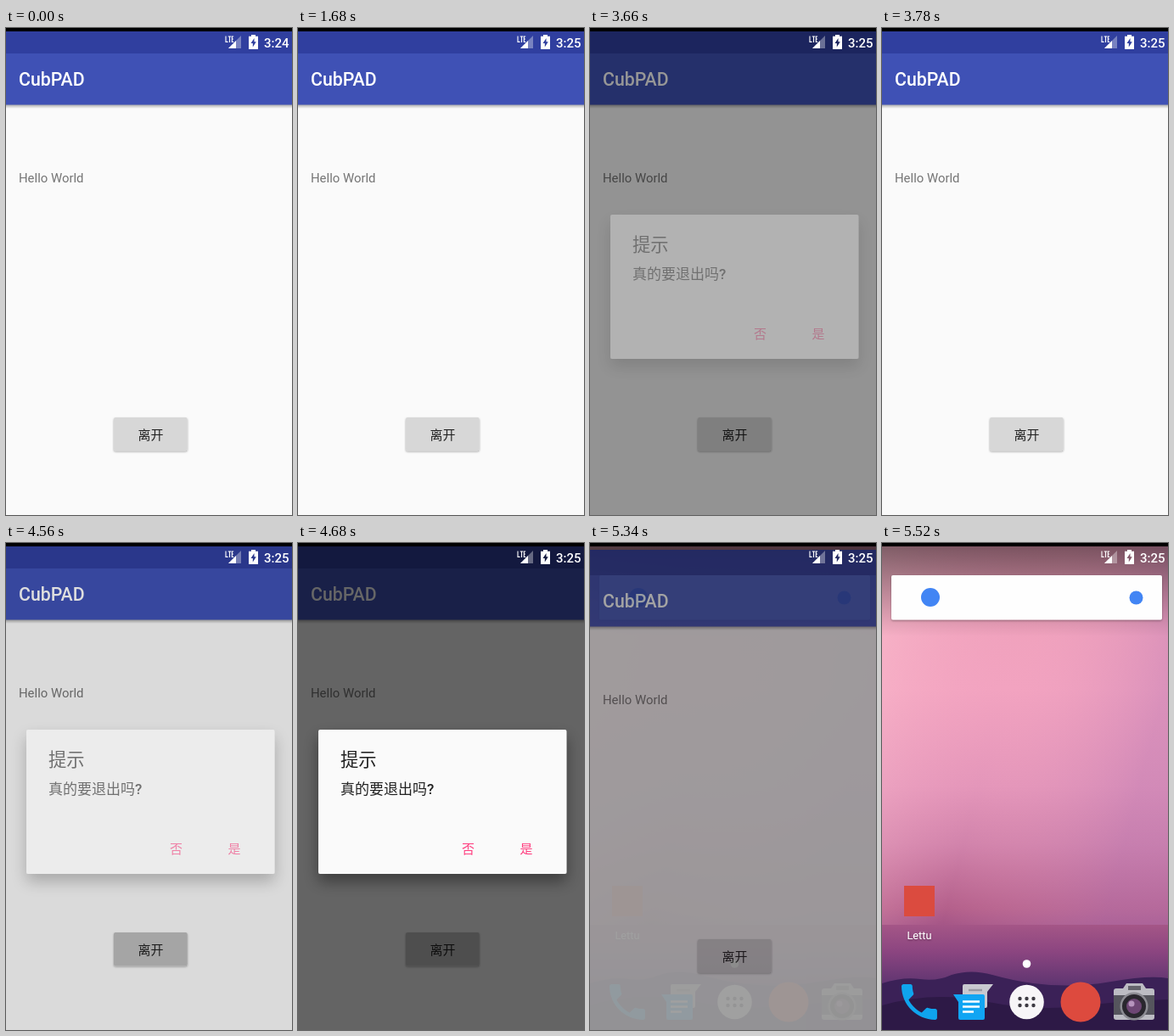
Write an HTML page that moves like this. It is 337 px wide and 574 px high and loops after 7260 ms.

```html
<!DOCTYPE html>
<html lang="zh-CN">
<head>
<meta charset="utf-8">
<title>Exit dialog</title>
<style>
  html, body { margin: 0; width: 100%; height: 100%; overflow: hidden; background: #000; }
  svg { display: block; width: 100%; height: 100%; }
  text { font-family: Roboto, "Noto Sans CJK SC", "Noto Sans CJK", sans-serif; }
  .medium { font-weight: 500; }
  .mid { text-anchor: middle; }
</style>
</head>
<body>
<svg viewBox="0 0 337 574">
  <defs>
    <linearGradient id="sky" x1="0" y1="0" x2="0" y2="1">
      <stop offset="0" stop-color="#eda0b9"/>
      <stop offset=".3" stop-color="#f2a3c0"/>
      <stop offset=".5" stop-color="#e496ba"/>
      <stop offset=".62" stop-color="#d183ab"/>
      <stop offset=".75" stop-color="#b4608b"/>
      <stop offset=".84" stop-color="#8b4580"/>
      <stop offset=".91" stop-color="#5d3470"/>
      <stop offset="1" stop-color="#38214f"/>
    </linearGradient>
    <linearGradient id="side" x1="0" y1="0" x2="1" y2=".35">
      <stop offset="0" stop-color="#ffc6d2" stop-opacity=".55"/>
      <stop offset=".5" stop-color="#f5a5c0" stop-opacity="0"/>
      <stop offset="1" stop-color="#b878b4" stop-opacity=".4"/>
    </linearGradient>
    <linearGradient id="scrim" x1="0" y1="0" x2="0" y2="1">
      <stop offset="0" stop-color="#000" stop-opacity=".5"/>
      <stop offset="1" stop-color="#000" stop-opacity="0"/>
    </linearGradient>
    <linearGradient id="edge" x1="0" y1="0" x2="0" y2="1">
      <stop offset="0" stop-color="#000" stop-opacity=".34"/>
      <stop offset="1" stop-color="#000" stop-opacity="0"/>
    </linearGradient>
    <filter id="low" x="-10%" y="-20%" width="120%" height="150%">
      <feDropShadow dx="0" dy="1.2" stdDeviation="1" flood-opacity=".35"/>
    </filter>
    <filter id="high" x="-20%" y="-30%" width="140%" height="170%">
      <feDropShadow dx="0" dy="9" stdDeviation="9" flood-opacity=".4"/>
    </filter>
  </defs>

  <g id="home">
    <rect width="337" height="574" fill="url(#sky)"/>
    <rect width="337" height="450" fill="url(#side)"/>
    <path d="M0 519Q25 511 45 514T82 509Q105 502 130 509T178 519Q225 525 270 517T337 513V574H0Z" fill="#3b2157"/>
    <path d="M0 545Q60 528 120 540T230 546T337 538V574H0Z" fill="#2d1946"/>
    <rect width="337" height="110" fill="url(#scrim)"/>
    <rect x="11" y="38" width="319" height="52.5" rx="2" fill="#fefefe" filter="url(#low)"/>
    <circle cx="57" cy="64" r="11" fill="#4285f4"/>
    <circle cx="299.5" cy="64.5" r="8" fill="#4285f4"/>
    <rect x="26" y="404" width="36" height="36" fill="#db4b3f"/>
    <text class="mid" x="44" y="467" font-size="12.8" fill="#fff" filter="url(#low)">Lettu</text>
    <circle cx="170.5" cy="496" r="4.8" fill="#fff"/>
    <path transform="translate(16 513) scale(2.33)" fill="#0fa4ee" d="M6.6 10.8c1.4 2.8 3.8 5.1 6.6 6.6l2.2-2.2c.3-.3.7-.4 1-.2 1.1.4 2.3.5 3.6.5.6 0 1 .5 1 1V20c0 .6-.4 1-1 1C10.600 21 3 13.400 3 4c0-.6.5-1 1-1h3.500c.6 0 1 .5 1 1 0 1.300.2 2.500.6 3.600.1.4 0 .7-.3 1z"/>
    <path d="M97 520H131L124 529V546Q124 548 122 548H97Q95 548 95 546V522Q95 520 97 520Z" fill="#c9c9d0"/>
    <path d="M102 527H118" stroke="#9899a3" stroke-width="2.500"/>
    <path d="M84 532H119Q121 532 121 534V560Q121 562 119 562H92Q90 562 90 560V541Z" fill="#11a5f3"/>
    <path d="M95 540.500H115M95 546.500H115M95 552.500H108" stroke="#fff" stroke-width="2.600"/>
    <circle cx="170.5" cy="541" r="20.300" fill="#f7f5f7"/>
    <path d="M162.500 537h0M170.500 537h0M178.500 537h0M162.500 545h0M170.500 545h0M178.500 545h0" stroke="#3d3a42" stroke-width="4.400" stroke-linecap="round"/>
    <circle cx="234" cy="541" r="23.500" fill="#dd4a3e"/>
    <path d="M276 525H284L288 519H307L311 525H318Q321 525 321 528V559Q321 562 318 562H276Q273 562 273 559V528Q273 525 276 525Z" fill="#bcbcc3"/>
    <path d="M273 533H321V556H273Z" fill="#55555d"/>
    <path d="M290 522H305V527H290Z" fill="#64646c"/>
    <circle cx="297" cy="546" r="16.500" fill="#8d8d94"/>
    <circle cx="297" cy="546" r="14" fill="#29272e"/>
    <circle cx="297" cy="546" r="9" fill="#6d4674"/>
    <circle cx="294" cy="543" r="3.500" fill="#b694bd"/>
  </g>

  <g id="app">
    <rect width="337" height="574" fill="#fafafa"/>
    <rect y="90" width="337" height="5" fill="url(#edge)"/>
    <rect width="337" height="30" fill="#303f9f"/>
    <rect y="30" width="337" height="60.500" fill="#3f51b5"/>
    <text class="medium" x="15" y="68" font-size="21.300" fill="#fff">CubPAD</text>
    <text x="15" y="182" font-size="14.900" fill="#757575">Hello World</text>
    <rect x="127" y="459" width="86.700" height="39.300" rx="2" fill="#d7d7d7" filter="url(#low)"/>
    <rect id="press" x="127" y="459" width="86.700" height="39.300" rx="2"/>
    <text class="medium mid" x="170.500" y="485" font-size="15" fill="#212121">离开</text>
  </g>

  <rect id="dim" width="337" height="574"/>

  <g id="dialog">
    <rect x="24" y="220" width="292.500" height="170" rx="2" fill="#fafafa" filter="url(#high)"/>
    <text x="50" y="262.500" font-size="21.300" fill="#212121">提示</text>
    <text class="medium" x="50" y="296" font-size="17" fill="#212121">真的要退出吗?</text>
    <g class="medium mid" font-size="15" fill="#ff4081">
      <text x="200.500" y="365.500">否</text>
      <text x="269" y="365.500">是</text>
    </g>
  </g>

  <rect width="337" height="4"/>
  <g fill="#fff">
    <path d="M277 9V24H262Z" opacity=".35"/>
    <path d="M271 15V24H262Z"/>
    <path d="M259 9.500V16.400H261.600M261.700 10H265.300M263.500 10V17M268.200 10H266.300V16.400H268.200M266.300 13H268" fill="none" stroke="#fff" stroke-width="1.100"/>
    <path fill-rule="evenodd" d="M289 8H294V9.800H297V25H286V9.800H289ZM292.500 12L288.500 18H290.800V22.500L294.800 16.300H292.500Z"/>
    <text id="clock" class="medium" x="304" y="23" font-size="15">3:24</text>
  </g>
</svg>
<script>
const LOOP = 7260, STEP = 60;
const $ = id => document.getElementById(id);
const [home, app, press, dim, dialog, clock] =
  ["home", "app", "press", "dim", "dialog", "clock"].map($);

// Rows: dim, dialog opacity, button press, app opacity, app offset
const open = [[0, 0, .06], [.04, .22, .1], [.13, .57, .12], [.36, .85, .12], [.6, 1, .09]];
const close = [[.41, .3], [.2, .06], [0, 0]];
const leave = [[.6, 0, 0, 1, 0], [.5, 0, 0, 1, 2], [.36, 0, 0, .9, 8],
               [.2, 0, 0, .6, 18], [.08, 0, 0, .25, 32], [0, 0, 0, 0, 46]];
const phases = [[5220, leave], [4440, open], [3660, close], [1860, open]];

function poseAt(t) {
  const phase = phases.find(([start]) => t >= start);
  if (!phase) return [0, 0];
  const [start, rows] = phase;
  return rows[Math.min(rows.length - 1, Math.floor((t - start) / STEP))];
}

function draw(t) {
  const [shade, card, push = 0, alpha = 1, y = 0] = poseAt(t);
  dim.setAttribute("opacity", shade);
  dialog.setAttribute("opacity", card);
  press.setAttribute("opacity", push);
  app.setAttribute("opacity", alpha);
  app.setAttribute("transform", `translate(0 ${y})`);
  home.setAttribute("visibility", t >= 5220 ? "visible" : "hidden");
  clock.textContent = t < 1680 ? "3:24" : "3:25";
}

const begin = performance.now();
function tick() {
  draw((performance.now() - begin) % LOOP);
  requestAnimationFrame(tick);
}
tick();
</script>
</body>
</html>
```
